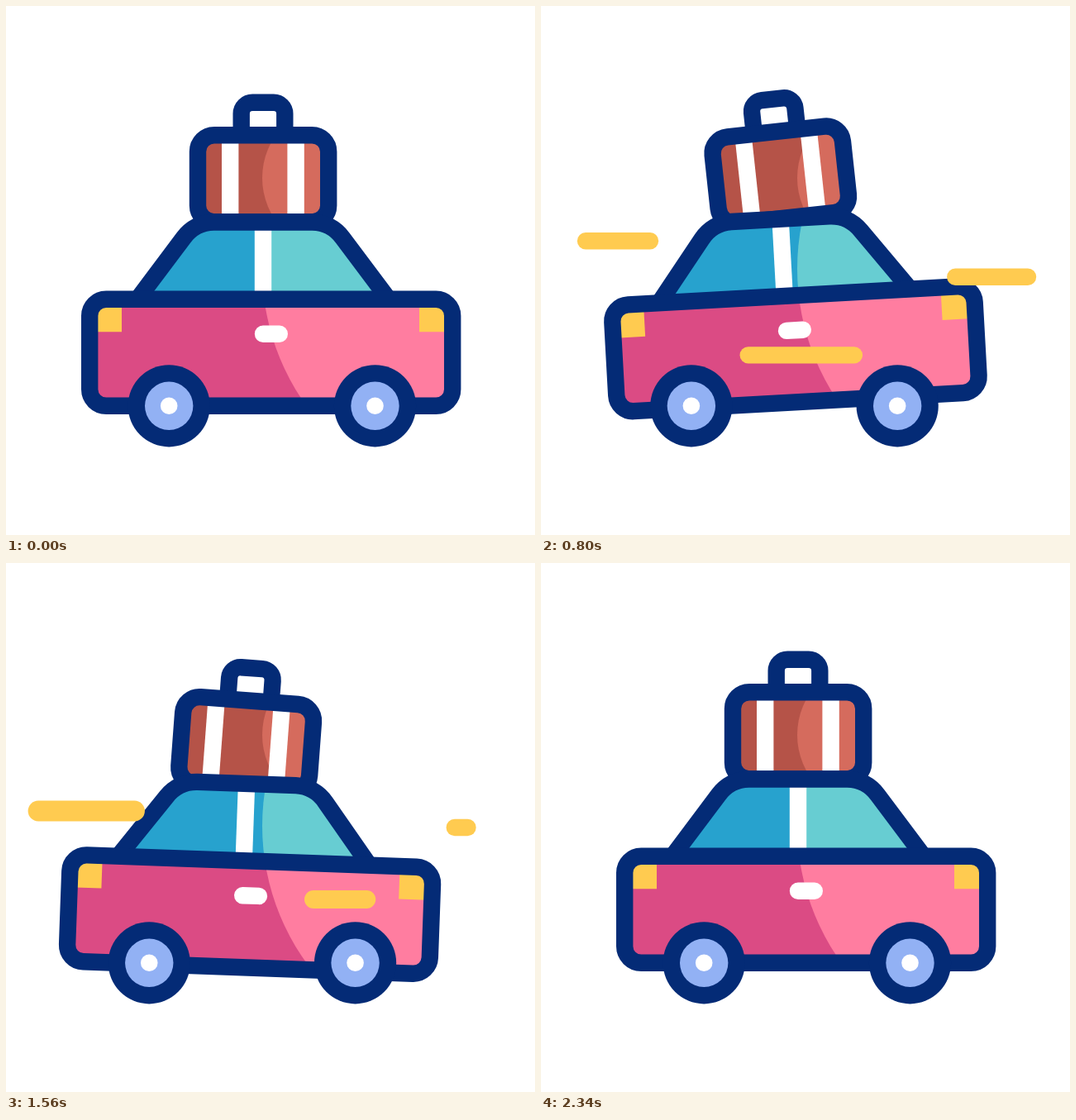
Recreate the animation shown at these times as an HTML page with a canvas. Size 640 px wide and 640 px high, loop 2420 ms.

```html
<!DOCTYPE html>
<html lang="en">
<head>
<meta charset="utf-8">
<title>Travelling car</title>
<style>
  html, body { margin: 0; width: 100%; height: 100%; overflow: hidden; background: #fff; }
  canvas { display: block; width: 640px; height: 640px; }
</style>
</head>
<body>
<canvas id="stage" width="640" height="640"></canvas>
<script>
const ctx = document.getElementById('stage').getContext('2d');
const LOOP = 2420;
const STROKE = 20.4;
const NAVY = '#042b76', YELLOW = '#ffcb50', WHITE = '#fff';

// Keys are [time, value]; every segment eases in and out.
const carX = [[0, 0], [600, -45], [1060, 28.1], [1700, -31.1], [2170, 0]];
const carY = [[0, 0], [480, 11], [1010, -12.6], [1430, 10.4], [1850, -9.6], [2340, 0]];
const carTilt = [[0, 0], [740, -3.3], [1380, 2.1], [1500, 2.1], [2340, 0]];
const caseY = [[60, 0], [570, 11.8], [1020, -12], [1480, 6.6], [1850, -8], [2260, 0]];
const caseTilt = [[60, 0], [790, -3], [1500, 2.2], [1700, 2.2], [2340, 0]];

const slow = { head: 540, delay: 270, life: 750 };
const fast = { head: 400, delay: 150, life: 640 };
const streaks = [
  { y: 284.2, from: 263, to: 54, width: 20.4, start: 250, pace: slow },
  { y: 422.4, from: 394, to: 194.5, width: 20.4, start: 450, pace: slow },
  { y: 327.8, from: 589, to: 367, width: 20.4, start: 569, pace: slow },
  { y: 407, from: 571, to: 372, width: 22, start: 1107, pace: fast },
  { y: 300, from: 226, to: 30.4, width: 25, start: 1212, pace: fast },
  { y: 320, from: 558.5, to: 348, width: 20.4, start: 1494, pace: fast }
];

const bodyShape = new Path2D();
bodyShape.roundRect(101.2, 354.8, 439, 129, 20);
const cabinShape = new Path2D(
  'M159 354.8L214.8 280.5A46 46 0 0 1 251.5 261.5H370.5A46 46 0 0 1 407.2 280.5L463 354.8');
const caseShape = new Path2D();
caseShape.roundRect(232, 156.2, 158.2, 105.2, 20);
const gripShape = new Path2D('M284.7 156V130.2a13.5 13.5 0 0 1 13.5-13.5h25.6a13.5 13.5 0 0 1 13.5 13.5V156');

function ease(u) {
  u = Math.min(1, Math.max(0, u));
  return u * u * (3 - 2 * u);
}

function valueAt(keys, t) {
  let value = keys[0][1];
  for (let i = 1; i < keys.length; i++) {
    const [t0, a] = keys[i - 1], [t1, b] = keys[i];
    if (t >= t0) value = a + (b - a) * ease((t - t0) / (t1 - t0));
  }
  return value;
}

function rotate(deg, x, y) {
  ctx.translate(x, y);
  ctx.rotate(deg * Math.PI / 180);
  ctx.translate(-x, -y);
}

function rect(color, x, y, w, h, r = 0) {
  ctx.fillStyle = color;
  ctx.beginPath();
  ctx.roundRect(x, y, w, h, r);
  ctx.fill();
}

function disc(color, x, y, r) {
  ctx.fillStyle = color;
  ctx.beginPath();
  ctx.arc(x, y, r, 0, Math.PI * 2);
  ctx.fill();
}

function outline(shape) {
  ctx.strokeStyle = NAVY;
  ctx.lineWidth = STROKE;
  ctx.lineCap = 'butt';
  ctx.stroke(shape);
}

// The lit area stays fixed on the stage while the shape moves under it.
function panel(shape, dark, light, cx, cy, r, details) {
  ctx.save();
  ctx.clip(shape);
  ctx.fillStyle = dark;
  ctx.fill(shape);
  ctx.save();
  ctx.resetTransform();
  disc(light, cx, cy, r);
  ctx.restore();
  details();
  ctx.restore();
  outline(shape);
}

function drawCase(t) {
  ctx.save();
  ctx.translate(0, valueAt(caseY, t));
  rotate(valueAt(caseTilt, t), 311, 150);
  outline(gripShape);
  panel(caseShape, '#b55348', '#d56b5d', 400, 208, 90, () => {
    rect(WHITE, 261, 150, 20.4, 110);
    rect(WHITE, 340.4, 150, 20.4, 110);
  });
  ctx.restore();
}

function drawCar(t) {
  ctx.save();
  ctx.translate(0, valueAt(carY, t));
  rotate(valueAt(carTilt, t), 320.7, 372.5);
  drawCase(t);
  panel(cabinShape, '#27a2ce', '#67cdd2', 594, 318, 284, () => {
    rect(WHITE, 300.8, 262, 20.4, 92);
  });
  panel(bodyShape, '#db4b84', '#ff7da0', 594, 318, 284, () => {
    rect(YELLOW, 101, 355, 39, 39.3);
    rect(YELLOW, 500, 355, 40, 39.3);
  });
  rect(WHITE, 300.8, 386.6, 40.2, 20.4, 10.2);
  ctx.restore();
  for (const x of [197.2, 446.5]) {
    disc(NAVY, x, 483.8, 49.6);
    disc('#92b1f4', x, 483.8, 29.2);
    disc(WHITE, x, 483.8, 10.3);
  }
}

function drawStreak({ y, from, to, width, start, pace }, t) {
  const age = t - start;
  if (age < 0 || age > pace.life) return;
  const at = u => from + (to - from) * ease(u);
  const head = at(age / pace.head);
  const tail = at((age - pace.delay) / (pace.life - pace.delay));
  rect(YELLOW, head - width / 2, y - width / 2, tail - head + width, width, width / 2);
}

function frame(now) {
  const t = now % LOOP;
  ctx.resetTransform();
  rect(WHITE, 0, 0, 640, 640);
  ctx.save();
  ctx.translate(valueAt(carX, t), 0);
  drawCar(t);
  ctx.restore();
  for (const streak of streaks) drawStreak(streak, t);
}

const origin = performance.now();
function tick() {
  frame(performance.now() - origin);
  requestAnimationFrame(tick);
}
tick();
</script>
</body>
</html>
```
